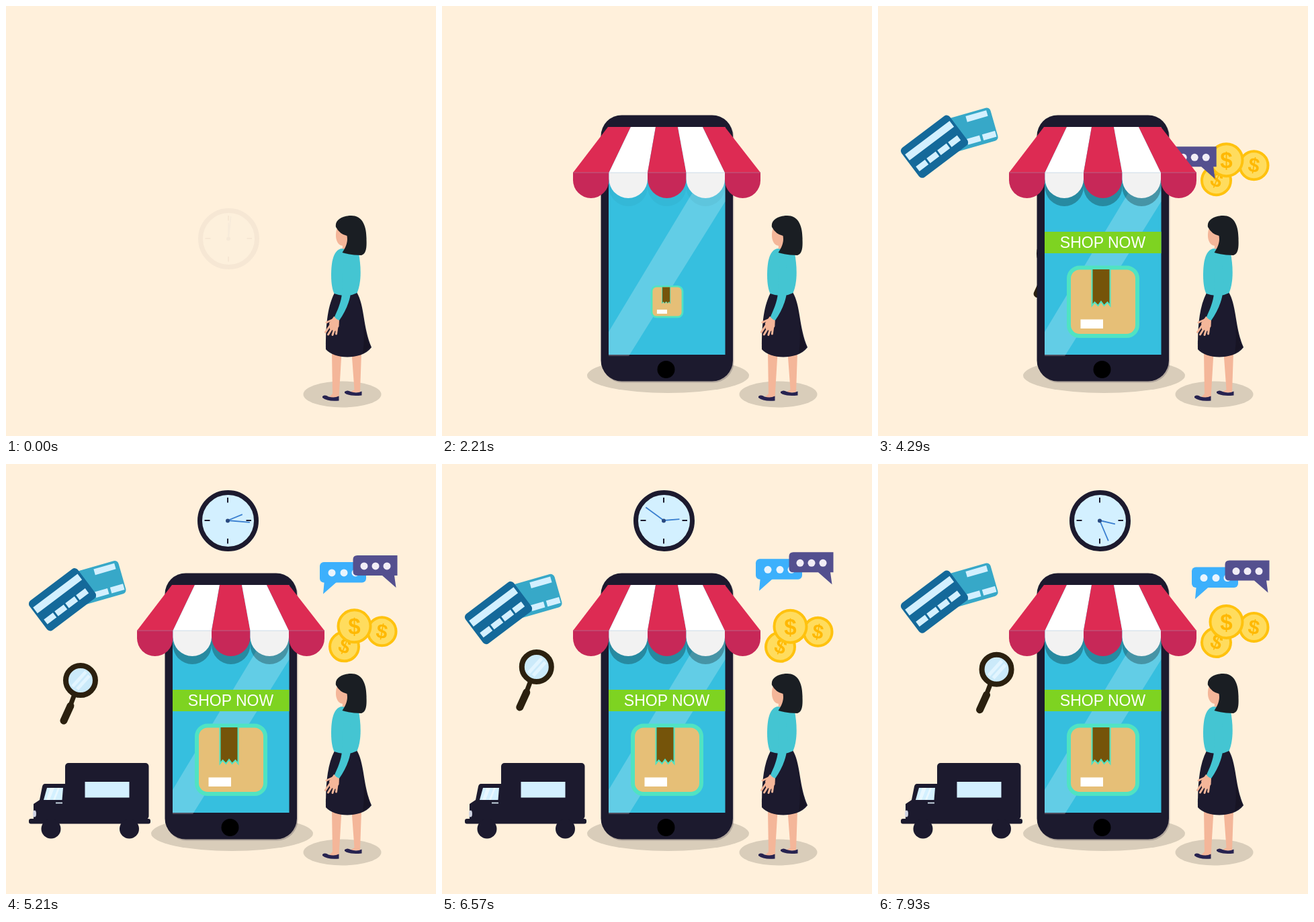
Recreate the animation shown at these times as an HTML page. Size 640 px wide and 640 px high, loop 8 s.

```html
<!DOCTYPE html>
<html lang="en">
<head>
<meta charset="utf-8">
<title>Shop now</title>
<style>
html, body { margin: 0; width: 100%; height: 100%; overflow: hidden; background: #fff0db; }
svg { display: block; width: 100%; height: 100%; }
text { font-family: "Liberation Sans", Arial, sans-serif; text-anchor: middle; }
.ink { fill: #1c1a2e; }
.ice { fill: #d3f0ff; }
.skin { fill: #f4b699; }
.teal { fill: #44c5d2; }
.coin { fill: #ffdc5e; stroke: #ffc20e; stroke-width: 4; }
.cash { fill: #ffb800; font-weight: bold; }
</style>
</head>
<body>
<svg viewBox="0 0 640 640">
  <defs>
    <clipPath id="glass"><rect x="248" y="180" width="173.500" height="339"/></clipPath>
  </defs>
  <rect width="640" height="640" fill="#fff0db"/>
  <ellipse id="floor" cx="336.500" cy="550" ry="26" fill="#d9cdba"/>

  <g id="truck">
    <rect class="ink" x="88" y="445" width="124.500" height="84" rx="5"/>
    <path class="ink" d="M58 476H90V530H41V506L50 500 54 480Q55 476 58 476Z"/>
    <rect class="ink" x="34" y="528" width="181" height="7.500" rx="3"/>
    <rect class="ice" x="117.500" y="473" width="66" height="23.500"/>
    <path class="ice" d="M61 482H85L83.500 500H56Z"/>
    <path d="M66 482h6l-7 18h-5zM77 482h3l-7 18h-3z" fill="#fff" opacity=".5"/>
    <path d="M74 504.500h10" stroke="#d3e4ee" stroke-width="1.800"/>
    <ellipse cx="42.500" cy="520.500" rx="2.500" ry="5" fill="#cfd3e2"/>
    <circle class="ink" cx="67" cy="543" r="14.500"/>
    <circle class="ink" cx="183.500" cy="543" r="14.500"/>
  </g>

  <g id="lens">
    <path d="M-9 21L-15 37" stroke="#2b200f" stroke-width="7"/>
    <path d="M-15 38L-25 60" stroke="#2b200f" stroke-width="11" stroke-linecap="round"/>
    <circle r="22" fill="#cbeafa" stroke="#2b200f" stroke-width="8"/>
    <path d="M-12 9L8 -13M-5 13L13 -7" stroke="#e2f5ff" stroke-width="5"/>
  </g>

  <g id="clock">
    <circle class="ice" cx="330.500" cy="84.500" r="42" stroke="#1c1a2e" stroke-width="7"/>
    <path d="M330 50v7.500M330 111v7.500M295.500 84h8M357.500 84h7.500" stroke="#1c1a2e" stroke-width="2"/>
    <path id="hour" d="M330 84V60.500" stroke="#3a7fd0" stroke-width="1.800"/>
    <path id="minute" d="M330 84V51" stroke="#3a7fd0" stroke-width="1.800"/>
    <circle cx="330" cy="84.500" r="3" fill="#2a4a80"/>
  </g>

  <g id="cards">
    <g transform="translate(134.500 178) rotate(-16)">
      <rect x="-40" y="-25.500" width="80" height="51" rx="6" fill="#37a8c8"/>
      <path class="ice" d="M2-22h32v9h-32zM18 11h20v9h-20zM-6 11h20v9h-20z"/>
    </g>
    <g transform="translate(84 201.500) rotate(-37)">
      <rect x="-45" y="-27.500" width="90" height="55" rx="6" fill="#14699a"/>
      <path class="ice" d="M-42-17h83v11h-83zM-40 7h17v9h-17zM-20 7h17v9h-17zM0 7h17v9h-17zM20 7h17v9h-17z"/>
    </g>
  </g>

  <g id="coins">
    <circle class="coin" cx="503.500" cy="271.500" r="21.500"/>
    <text class="cash" font-size="30" transform="translate(504 271) rotate(22)" y="10">$</text>
    <circle class="coin" cx="559.500" cy="249" r="21"/>
    <text class="cash" font-size="30" transform="translate(559.500 249) rotate(10)" y="10">$</text>
    <circle class="coin" cx="518.500" cy="241" r="24"/>
    <text class="cash" font-size="33" x="518.500" y="253">$</text>
  </g>

  <g id="chat">
    <path d="M474 172L472 193.500 494 174Z" fill="#3cb0fc"/>
    <rect x="467" y="146" width="69" height="30.500" rx="6" fill="#3cb0fc"/>
    <g fill="#e9f4fd"><circle cx="485" cy="162" r="5.500"/><circle cx="503" cy="162" r="5.500"/><circle cx="520" cy="162" r="5.500"/></g>
    <path d="M523 136H582.500V166H578L580.500 184 560 166H523Q516.500 166 516.500 160V142Q516.500 136 523 136Z" fill="#54508f"/>
    <g fill="#f1edf6"><circle cx="533" cy="152" r="5.500"/><circle cx="550" cy="152" r="5.500"/><circle cx="567" cy="152" r="5.500"/></g>
  </g>

  <g id="phone">
    <rect x="238" y="164.500" width="196.500" height="396" rx="31" fill="#1c1a2e" opacity=".22"/>
    <rect class="ink" x="236.500" y="162.500" width="196.500" height="396" rx="31"/>
    <circle cx="333.500" cy="541" r="13"/>
    <rect x="248" y="180" width="173.500" height="339" fill="#36bfdf"/>
    <path d="M248 485V521H278L421.500 291V197Z" fill="#fff" opacity=".22"/>
  </g>

  <g id="banner">
    <rect x="248" y="336" width="173.500" height="32" fill="#7ed321"/>
    <text x="334.500" y="360" font-size="23" fill="#fff">SHOP NOW</text>
  </g>
  <g id="parcel" stroke="#50e3c2">
    <rect x="284" y="389.500" width="102" height="101.500" rx="16" fill="#e6bf77" stroke-width="6"/>
    <path d="M318.500 392V446l4-5 5 5 4.500-6 4.500 6 5-5 4 5V392" fill="#75540a" stroke-width="2"/>
    <rect x="301.500" y="466.500" width="33.500" height="13.500" fill="#fff" stroke="none"/>
  </g>

  <g id="awning">
    <g clip-path="url(#glass)"><g id="shade"></g></g>
    <g id="frill"></g>
    <g id="roof"></g>
    <path d="M195 248H474" stroke="#8fb4d4" stroke-width=".8" opacity=".5"/>
  </g>

  <g id="woman">
    <ellipse cx="500.500" cy="578" rx="58" ry="19.500" fill="#d9cdba"/>
    <path class="skin" d="M485 516H499.500L495.500 583H480L486 577ZM514.500 516H529L527 575H512L518.500 571Z"/>
    <path d="M471 581Q475 578 480 581.500 489 584 495.500 580.500V587.500Q478 589 471 583ZM504 574Q508 571 513 574 522 577 529.500 573.500V579.500Q511 581.500 504 576Z" fill="#272350"/>
    <path class="skin" d="M493 330C490 338 490 348 495 354Q498 357 501 357L500 366H509V332Z"/>
    <path class="ink" d="M489 427L522 426C534 446 531 478 544 508C536 519 520 522.500 508 522.500C495 522.500 482 518 476 511C476 482 477 450 489 427Z"/>
    <path d="M522 430C532 450 530 480 542 508L531 517C536 480 530 455 522 430Z" fill="#14121f" opacity=".6"/>
    <path class="teal" d="M499 361C487 364 484 381 484 401C484 414 486 423 488.500 428Q507 435 522.500 427C530 409 528 385 525 368L506 362Z"/>
    <path d="M491 329C489 318 501 312 514 312C529 312 537 325 536.500 348C537 360 536 369 529 371Q513 371 500.500 367C507 357 509 350 507.500 342Q497 340 491 329Z" fill="#1a1e23"/>
    <g id="arm">
      <path class="skin" d="M488 462L496 466 495.500 477 490 484 482 481 481 472Z"/>
      <path d="M486 467L477 471M482 476L475.500 485.500M485 480L479.500 489M489 480L486 489.500M493 477L491.500 488" stroke="#f4b699" stroke-width="3" stroke-linecap="round"/>
      <path class="teal" d="M503 385C499 400 501 424 499.500 432C497 447 491 457 489 463Q492 467 496 468C504 457 511 442 513 428C515 408 514 393 512 385Z"/>
    </g>
  </g>
</svg>
<script>
const LOOP = 8000;
const el = {};
document.querySelectorAll('g[id], path[id], ellipse[id]').forEach(n => el[n.id] = n);

// Awning stripes: edges at the roof top and at the frill line.
const top5 = [247, 281, 318, 351, 388, 421];
const low5 = [195, 248.5, 306, 363.5, 421, 474];
let roof = '', frill = '', shade = '';
for (let i = 0; i < 5; i++) {
  const a = low5[i], b = low5[i + 1], r = (b - a) / 2;
  const scallop = `M${a} 247.500V${286 - r}A${r} ${r} 0 0 0 ${b} ${286 - r}V247.500Z`;
  roof += `<path d="M${top5[i]} 180H${top5[i + 1]}L${b} 248H${a}Z" fill="${i % 2 ? '#fff' : '#dd2b53'}"/>`;
  frill += `<path d="${scallop}" fill="${i % 2 ? '#f2f2f2' : '#c72858'}"/>`;
  shade += `<path d="${scallop}" transform="translate(0 12)"/>`;
}
el.roof.innerHTML = roof;
el.frill.innerHTML = frill;
el.shade.innerHTML = shade;

const part = (t, from, to) => Math.min(1, Math.max(0, (t - from) / (to - from)));
const inOut = u => u < .5 ? 4 * u ** 3 : 1 - 4 * (1 - u) ** 3;
const out = u => 1 - (1 - u) ** 3;
const back = (u, s) => 1 + (s + 1) * (u - 1) ** 3 + s * (u - 1) ** 2;
const cosd = d => Math.cos(d * Math.PI / 180);
const sind = d => Math.sin(d * Math.PI / 180);

const place = (name, value) => el[name].setAttribute('transform', value);
const move = (name, x, y) => place(name, `translate(${x} ${y})`);
const show = (name, on) => el[name].style.display = on ? '' : 'none';
const zoom = (name, x, y, sx, sy) =>
  place(name, `translate(${x} ${y}) scale(${sx} ${sy}) translate(${-x} ${-y})`);

// Slides a part from behind the phone to its resting place.
function fly(name, p, dx, dy, bob = 0) {
  move(name, dx * (1 - p), dy * (1 - p) + bob);
}

function draw(t) {
  const pop = part(t, 430, 950);
  const size = pop ? Math.max(0, back(pop, 1.45)) : 0;
  const wobble = t < 1210 ? 1 : Math.exp((1210 - t) / 250) * Math.cos((t - 1210) / 110);
  show('phone', pop > 0);
  zoom('phone', 335, 361, size, size);
  el.floor.setAttribute('rx', Math.min(1, size) * (120.5 - 3 * wobble));
  show('floor', pop > 0);

  const unfold = out(part(t, 800, 1180));
  show('awning', unfold > 0);
  zoom('awning', 334, 180, 1, unfold);
  zoom('frill', 334, 248, 1, 1 + .08 * wobble);
  el.shade.setAttribute('opacity', .28 * part(t, 2140, 2700));

  const box = part(t, 2140, 2700);
  const boxSize = Math.max(0, back(box, 1.2));
  show('parcel', box > 0);
  zoom('parcel', 335, 440, boxSize, boxSize);
  const wipe = out(part(t, 3000, 3320));
  show('banner', wipe > 0);
  zoom('banner', 334.5, 352, wipe, 1);

  const swing = t < 3000 ? inOut(part(t, 2140, 2860)) : 1 - part(t, 3000, 3500) ** 2;
  place('arm', `rotate(${25 * swing} 507 378)`);

  const ready = t > 3500;
  ['cards', 'coins', 'chat', 'lens'].forEach(n => show(n, ready));
  const wave = (period, phase) => cosd(phase + 360 * (t - 5210) / period);
  fly('cards', inOut(part(t, 3550, 4250)), 226, 150, 10 - 10.4 * wave(3400, 20));
  fly('coins', inOut(part(t, 3550, 4250)), -196, 105, -1.1 + 11 * wave(3000, -83));
  fly('chat', inOut(part(t, 3850, 4650)), -218, 181, 8 * wave(3400, 90));

  const p = inOut(part(t, 3950, 4750));
  const turn = 216 + 29.4 * (t - 5210) / 1000;
  move('lens',
    334 + (153.5 + 52.6 * cosd(turn) - 334) * p,
    379 + (353 + 52.6 * sind(turn) - 379) * p);

  // The clock waits as a faint trace until the phone hides it.
  show('clock', ready || t < 900);
  el.clock.setAttribute('opacity', ready ? 1 : .035);
  fly('clock', inOut(part(t, 4100, 4900)), 1, 262);
  const hands = (t + 40) / 1000 * 155.2;
  place('minute', `rotate(${hands} 330 84)`);
  place('hour', `rotate(${hands / 12} 330 84)`);

  const drive = part(t, 4560, 5180);
  show('truck', drive > 0);
  fly('truck', back(drive, .8), 207, -155);
}

function tick() {
  draw(performance.now() % LOOP);
  requestAnimationFrame(tick);
}
tick();
</script>
</body>
</html>
```
